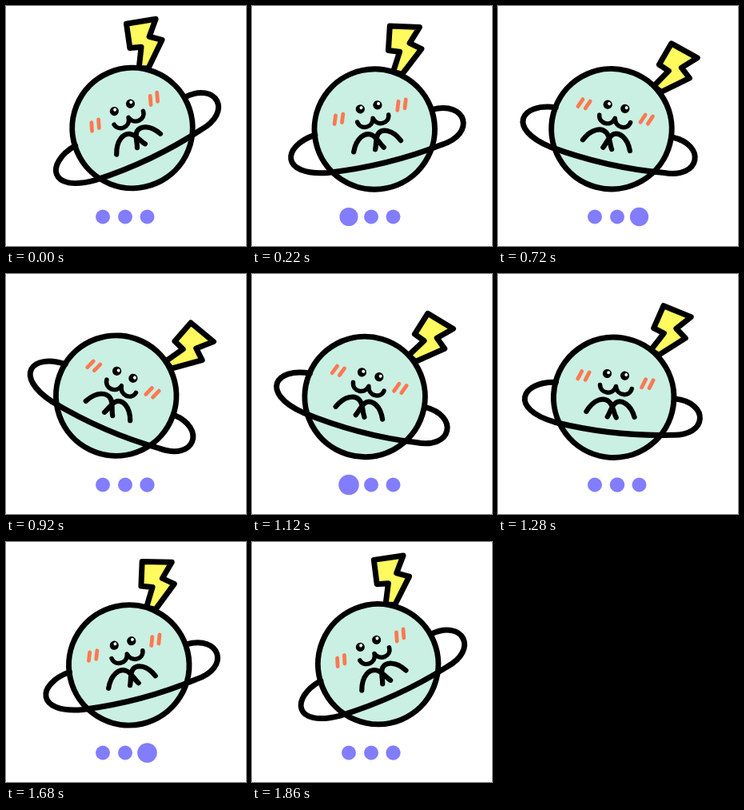
An HTML page that plays this animation: 300x300 px, repeating every 1880 ms.

```html
<!DOCTYPE html>
<html lang="en">
<head>
<meta charset="utf-8">
<title>Swinging planet</title>
<style>
  html, body { margin: 0; width: 100%; height: 100%; overflow: hidden; background: #fff; }
  svg { display: block; width: 100vw; height: 100vh; }
  .ink { fill: none; stroke: #000; stroke-width: 7; stroke-linecap: round; stroke-linejoin: round; }
</style>
</head>
<body>
<svg viewBox="0 0 300 300">
  <g id="planet">
    <path class="ink" style="fill:#fffa5e"
      d="M193 32 229 41 213 58 226 68 196 94 185.500 89 198.500 66 185 61.500Z"/>
    <circle class="ink" style="fill:#c9f0e2" cx="148.300" cy="154.500" r="75.200"/>
    <path class="ink"
      d="M74 146.500C30 152 21 188 80 196Q155 203 226 190.500C272 186 268 143 224 145"/>
    <path class="ink" style="stroke:#ff7852;stroke-width:4.8"
      d="M104 128 100.500 138M113.500 128 110 138M184.500 126.500 181 137M194 126 190.500 136.500"/>
    <circle cx="135.800" cy="126.300" r="5.600"/>
    <circle cx="158" cy="125.700" r="5.600"/>
    <circle cx="137.300" cy="124.800" r="2" fill="#fff"/>
    <circle cx="159.500" cy="124.200" r="2" fill="#fff"/>
    <path class="ink" style="stroke-width:5.5"
      d="M129 141.500C131 152.500 147 152.500 149 140.500C152 152.500 168 151.500 169 140.500"/>
    <path class="ink" style="stroke-width:6.2"
      d="M117 177C124 160 136 156 143 160.500C149 164 150 172 155 179M177.500 175C170 159 158 156 152 160.500C147 165 147 173 144 179.500"/>
  </g>
  <g id="dots" fill="#827dfd">
    <circle cx="121" cy="263.500"/>
    <circle cx="149" cy="263.500"/>
    <circle cx="176.500" cy="263.500"/>
  </g>
</svg>
<script>
  const SWING = 940, TILT = 25, REST_TILT = -1.6;
  const planet = document.getElementById('planet');
  const dots = [...document.querySelectorAll('#dots circle')];
  const start = performance.now();

  function draw(now) {
    const t = Math.max(0, now - start) % (2 * SWING);
    // Constant-speed swing, out and back
    const angle = TILT - 2 * TILT * Math.abs(t / SWING - 1);
    planet.setAttribute('transform', `rotate(${angle - REST_TILT} 148.3 130)`);

    // One dot after another swells, three per swing
    const phase = (t % SWING) / SWING * 3;
    dots.forEach((dot, i) => {
      const p = phase - i;
      const swell = p > 0 && p < 1 ? Math.sin(Math.PI * p) ** 2 : 0;
      dot.setAttribute('r', 9 + 4 * swell);
    });
    requestAnimationFrame(draw);
  }
  draw(start);
</script>
</body>
</html>
```
